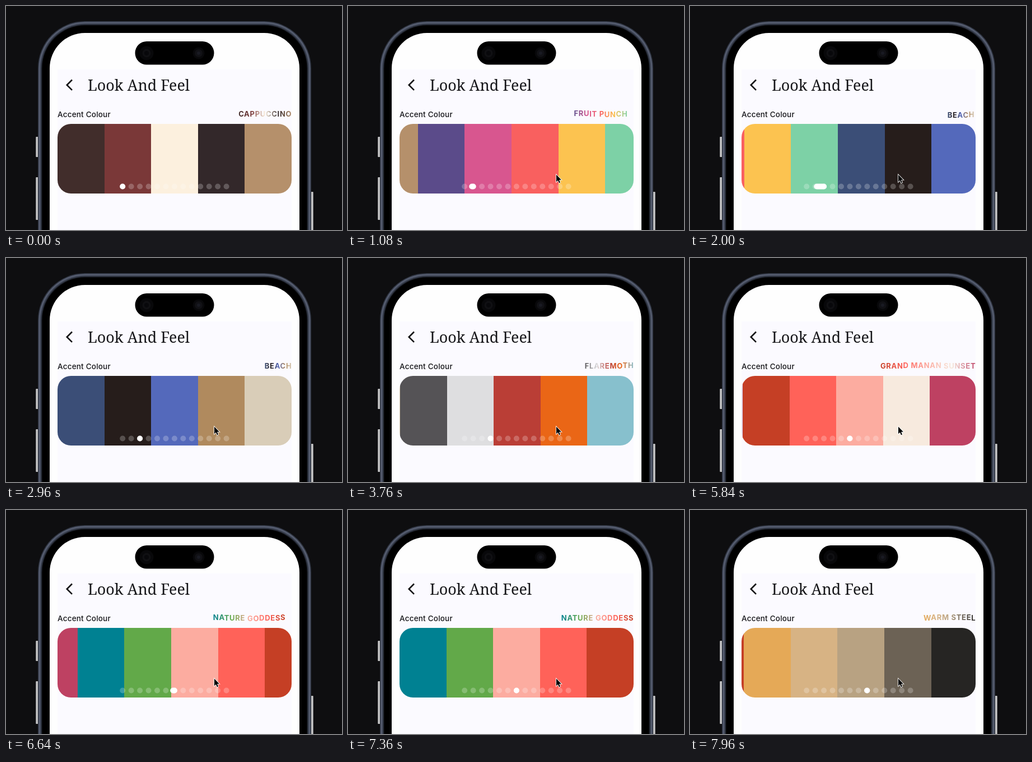
An HTML page with a canvas for the animation above (8000 ms loop, 600x399 px).

```html
<!DOCTYPE html>
<html lang="en">
<head>
<meta charset="utf-8">
<title>Look And Feel</title>
<style>
  html, body { margin: 0; width: 100%; height: 100%; overflow: hidden; background: #0e0e10; }
  canvas { display: block; }
</style>
</head>
<body>
<canvas id="stage" width="600" height="399"></canvas>
<script>
const ctx = document.getElementById('stage').getContext('2d');
const LOOP = 8000;
const CARD = { x: 92, y: 210, w: 418, h: 124, r: 24 };
const DOTS = { count: 13, x: 208.2, y: 321.5, gap: 15.45, r: 5 };
const INK = '#151518';
const SPRING = 0.011;      // swipe spring rate per ms
const HALFWAY = 153;       // ms from the start of a swipe to its midpoint
const CURSOR_SHOWN = 480;

// start: when the swipe towards the palette begins
const palettes = [
  { name: 'CAPPUCCINO', start: -LOOP, colors: ['#412d2b', '#7a3838', '#fcf0de', '#33282a', '#b5906b'] },
  { name: 'FRUIT PUNCH', start: 700, colors: ['#5b4b8a', '#d8568f', '#f9605f', '#fcc350', '#7dd1a6'] },
  { name: 'BEACH', start: 1821, colors: ['#3b4e77', '#261d1b', '#5469bb', '#b08a5e', '#d9cdb8'] },
  { name: 'FLAREMOTH', start: 3005, colors: ['#555356', '#dedee0', '#ba3e36', '#ea6616', '#87c0cd'] },
  { name: 'MELINA TORVEN', start: 4165, colors: ['#f0b8c2', '#000000', '#fdfcfe', '#b0adad', '#e3dbf9'] },
  { name: 'GRAND MANAN SUNSET', start: 5160, colors: ['#c53f25', '#ff6259', '#fcaca0', '#f7eade', '#be4162'] },
  { name: 'NATURE GODDESS', start: 6270, colors: ['#008192', '#62a949', '#fcaca0', '#ff6259', '#c53f25'] },
  { name: 'WARM STEEL', start: 7360, colors: ['#e5a957', '#d7b384', '#b8a282', '#6c6255', '#262523'] }
];

function roundRect(x, y, w, h, r, fill) {
  ctx.beginPath();
  ctx.roundRect(x, y, w, h, r);
  ctx.fillStyle = fill;
  ctx.fill();
}

function circle(x, y, r, fill) {
  ctx.beginPath();
  ctx.arc(x, y, r, 0, Math.PI * 2);
  ctx.fillStyle = fill;
  ctx.fill();
}

function gradient(x0, x1, colors) {
  const g = ctx.createLinearGradient(x0, 0, x1, 0);
  colors.forEach((color, i) => g.addColorStop(i / (colors.length - 1), color));
  return g;
}

function setFont(font, spacing = 0) {
  ctx.font = font;
  ctx.letterSpacing = spacing + 'px';
}

function drawPhone() {
  ctx.fillStyle = '#0e0e10';
  ctx.fillRect(0, 0, 600, 399);

  const metal = ['#77777a', '#dedede', '#5c5c60'];
  roundRect(53, 233, 5, 36, 1, gradient(53, 58, metal));
  roundRect(53, 305, 5, 76, 1, gradient(53, 58, metal));
  roundRect(544, 331, 5, 80, 1, gradient(549, 544, metal));

  // concentric shells from the metal rim to the screen
  const shells = [[0, '#303643'], [1.5, '#565d70'], [4, '#3a4150'], [6, '#1d2029'], [7.5, '#000'], [21, '#fefefe']];
  for (const [inset, fill] of shells) {
    roundRect(57 + inset, 27 + inset, 488 - 2 * inset, 600, 84 - inset, fill);
  }

  ctx.fillStyle = '#fbfaff';
  ctx.fillRect(CARD.x, 113, CARD.w, 286);

  roundRect(230.5, 63, 141, 41.5, 20.7, '#000');
  circle(251, 84, 12.5, '#08080a');
  circle(251, 84, 7.5, '#101013');
  circle(251, 84, 4, '#08080b');
  circle(344, 84, 10.5, '#08080a');
  circle(344, 84, 7, '#111115');
  circle(344, 84, 3, '#191a22');
}

function drawHeader() {
  ctx.beginPath();
  ctx.moveTo(118, 131.5);
  ctx.lineTo(108.8, 140.7);
  ctx.lineTo(118, 149.9);
  ctx.strokeStyle = INK;
  ctx.lineWidth = 2.7;
  ctx.stroke();

  ctx.fillStyle = INK;
  setFont('500 26.9px "Noto Serif", serif');
  ctx.fillText('Look And Feel', 146, 151);
  setFont('500 13.5px Inter, sans-serif', 0.2);
  ctx.fillText('Accent Colour', 92, 197.7);
}

function drawName({ name, colors, start }, t) {
  setFont('700 13px Inter, sans-serif', 0.7);
  const width = ctx.measureText(name).width;
  const left = 510.3 - width;
  const age = t - start - HALFWAY;
  const sway = age < 430 ? -11 * Math.sin(Math.PI * age / 430) : 0;
  const wave = 3 * Math.exp(-age / 200);
  ctx.fillStyle = gradient(left + sway, left + sway + width, colors);
  [...name].forEach((letter, i) => {
    const x = left + sway + ctx.measureText(name.slice(0, i + 1)).width - ctx.measureText(letter).width;
    ctx.fillText(letter, x, 196.6 + wave * Math.cos(age / 100 - i * 0.3));
  });
}

function drawCard(scroll) {
  const swatch = CARD.w / 5;
  ctx.save();
  ctx.beginPath();
  ctx.roundRect(CARD.x, CARD.y, CARD.w, CARD.h, CARD.r);
  ctx.clip();
  palettes.forEach(({ colors }, page) => {
    if (Math.abs(page - scroll) >= 1) return;
    colors.forEach((color, i) => {
      const x = Math.round(CARD.x + (page - scroll) * CARD.w + i * swatch);
      ctx.fillStyle = color;
      ctx.fillRect(x, CARD.y, Math.ceil(swatch), CARD.h);
    });
  });
  ctx.restore();
}

// The marker stretches to the next dot, then its tail catches up.
function drawDots(scroll) {
  const { count, x, y, gap, r } = DOTS;
  for (let i = 0; i < count; i++) circle(x + i * gap, y, r, 'rgba(255,255,255,.23)');
  const page = Math.floor(scroll);
  const part = scroll - page;
  const head = x + (page + Math.min(1, part * 2)) * gap;
  const tail = x + (page + Math.max(0, part * 2 - 1)) * gap;
  roundRect(tail - r, y - r, head - tail + 2 * r, 2 * r, r, '#fff');
}

function drawCursor() {
  const arrow = new Path2D('M372 300.5V313.2L374.9 310.5L377 315.3L379 314.4L377 309.7H380.9Z');
  ctx.lineWidth = 1.7;
  ctx.strokeStyle = '#fff';
  ctx.stroke(arrow);
  ctx.fillStyle = '#000';
  ctx.fill(arrow);
}

function swipeProgress(elapsed) {
  const k = SPRING * Math.max(0, elapsed);
  return 1 - (1 + k) * Math.exp(-k);
}

function render() {
  const t = performance.now() % LOOP;
  const scroll = palettes.slice(1).reduce((sum, p) => sum + swipeProgress(t - p.start), 0);
  const current = palettes.findLast(p => t >= p.start + HALFWAY);
  drawPhone();
  drawHeader();
  drawName(current, t);
  drawCard(scroll);
  drawDots(scroll);
  if (t >= CURSOR_SHOWN) drawCursor();
  requestAnimationFrame(render);
}
render();
</script>
</body>
</html>
```
